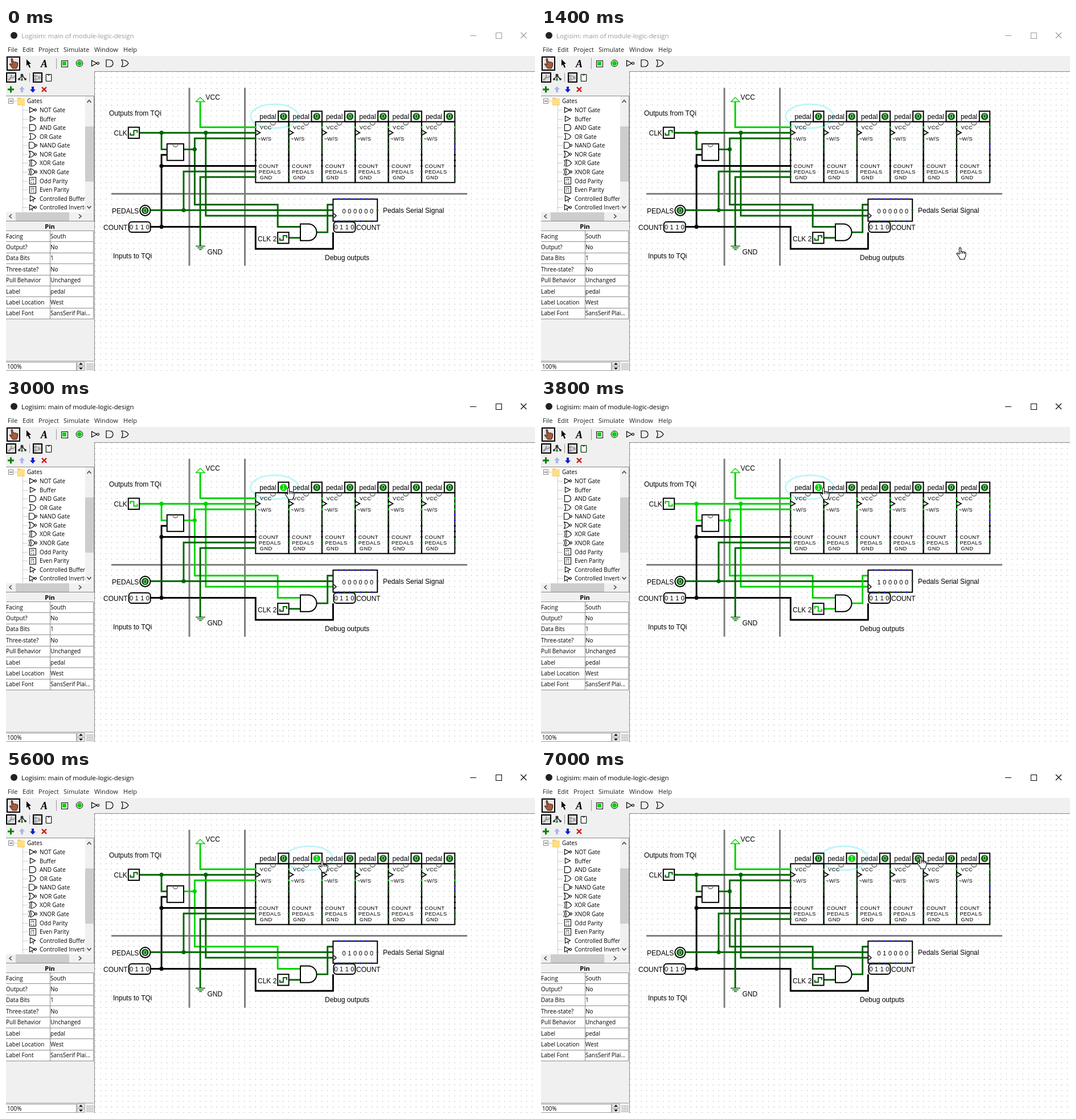
An HTML page that plays this animation: 929x603 px, repeating every 7.1 s.

```html
<!DOCTYPE html>
<html lang="en">
<head>
<meta charset="utf-8">
<title>Logic design</title>
<style>
html, body { margin: 0; width: 100%; height: 100%; overflow: hidden; background: #fff; }
svg { display: block; width: 929px; height: 603px; }
text { white-space: pre; }
.ui { font-family: "Open Sans", "Noto Sans", sans-serif; font-size: 10px; }
.menu { font-family: "Open Sans", "Noto Sans", sans-serif; font-size: 11.1px; fill: #222; }
.lab { font-family: "Liberation Sans", Arial, sans-serif; font-size: 12px; }
.port { font-family: "Liberation Sans", Arial, sans-serif; font-size: 9.3px; letter-spacing: .4px; }
.num { font-family: "Liberation Sans", Arial, sans-serif; font-size: 11px; text-anchor: middle; }
.wire { fill: none; stroke-width: .3; }
.wave { fill: none; stroke-width: 2; }
.box { fill: none; stroke: #000; stroke-width: 2; }
.thin { fill: none; stroke: #000; stroke-width: 1.2; }
</style>
</head>
<body>
<svg id="stage" viewBox="0 0 929 603" xmlns="http://www.w3.org/2000/svg"></svg>
<script>
const stage = document.getElementById('stage');
// The circuit lies on a grid: X0, Y0 is the clock input of the first chip
const X0 = 438.3, Y0 = 184.2, GRID = 9.72;
const LOOP = 7100, ON = '#00d200', OFF = '#006400';
const range = n => [...Array(n).keys()];

const rect = (x, y, w, h, fill, extra = '') =>
  `<rect x="${x}" y="${y}" width="${w}" height="${h}" fill="${fill}" ${extra}/>`;
const box = (x, y, w, h, rx = 0) =>
  `<rect class="box" x="${x}" y="${y}" width="${w}" height="${h}" rx="${rx}"/>`;
const text = (cls, x, y, s, extra = '') => `<text class="${cls}" x="${x}" y="${y}" ${extra}>${s}</text>`;
const line = (d, color, width = 1, extra = '') =>
  `<path d="${d}" fill="none" stroke="${color}" stroke-width="${width}" ${extra}/>`;
const shape = (d, fill, extra = '') => `<path d="${d}" fill="${fill}" ${extra}/>`;
const dot = (x, y, r, fill, extra = '') => `<circle cx="${x}" cy="${y}" r="${r}" fill="${fill}" ${extra}/>`;
const wire = (d, color) => `<path class="wire" d="${d}" stroke="${color}"/>`;
const onGrid = s => `<g transform="translate(${X0} ${Y0}) scale(${GRID})">${s}</g>`;
const crisp = 'shape-rendering="crispEdges"';

// Small gate symbols centred on (x, y)
const gates = {
  buffer: 'M-5 -5L5 0L-5 5Z',
  not: 'M-6 -5L3 0L-6 5ZM3 0a2 2 0 1 0 4 0a2 2 0 1 0-4 0',
  and: 'M-6 -6H0A6 6 0 0 1 0 6H-6Z',
  nand: 'M-7 -6H-2A6 6 0 0 1-2 6H-7ZM4 0a2 2 0 1 0 4 0a2 2 0 1 0-4 0',
  or: 'M-6 -6Q3 -6 6 0Q3 6-6 6Q-2 0-6 -6Z',
  nor: 'M-7 -6Q0 -6 3 0Q0 6-7 6Q-3 0-7 -6ZM3 0a2 2 0 1 0 4 0a2 2 0 1 0-4 0',
  xor: 'M-4 -6Q4 -6 7 0Q4 6-4 6Q0 0-4 -6ZM-7 -6Q-3 0-7 6',
  xnor: 'M-5 -6Q1 -6 4 0Q1 6-5 6Q-1 0-5 -6ZM-8 -6Q-4 0-8 6M4 0a2 2 0 1 0 4 0a2 2 0 1 0-4 0',
  ctrl: 'M-5 -5L5 0L-5 5ZM1 3V7',
  ctrlNot: 'M-6 -5L3 0L-6 5ZM3 0a2 2 0 1 0 4 0a2 2 0 1 0-4 0M-1 3V7'
};
const gate = (kind, x, y, s = 1) => `<path class="thin" transform="translate(${x} ${y}) scale(${s})" d="${gates[kind]}"/>`;
const parity = (x, y) => rect(x - 5, y - 6, 11, 12, '#fff', `stroke="#000" ${crisp}`) +
  text('ui', x + .5, y - .5, '2k', 'style="font-size:6px" text-anchor="middle"') +
  text('ui', x + .5, y + 5, '+1', 'style="font-size:6px" text-anchor="middle"');
const chevron = (x, y, turn) =>
  `<path d="M-3.5 2L0 -2L3.5 2" transform="translate(${x} ${y}) rotate(${turn})" fill="none" stroke="#444" stroke-width="1.5"/>`;

function header() {
  const menus = [['File', 3], ['Edit', 29], ['Project', 57], ['Simulate', 101], ['Window', 155], ['Help', 206]];
  return rect(0, 0, 929, 49, '#fff') + rect(0, 49, 929, 28, '#f0f0f0') +
    dot(14, 13, 6, '#222') +
    text('menu', 27, 17.5, 'Logisim: main of module-logic-design', 'style="font-size:11.4px;fill:var(--title)"') +
    line('M815 13.5H826', 'var(--title)', 1.1, crisp) +
    `<rect x="860" y="8" width="10" height="10" fill="none" stroke="var(--title)" ${crisp}/>` +
    line('M904 8L914 18M914 8L904 18', 'var(--title)', 1.2) +
    menus.map(([s, x]) => text('menu', x, 42, s)).join('');
}

function toolbar() {
  const hand = 'M9 54q1.5-1 2.5 0l1 6l1.5-1l1.5 1l1.5-.5l1.5 1l2 .5v5l-2 5h-7l-5-7q0-2 2-1l2 2z';
  const hub = line('M28 83L23 90M28 83L28 90M28 83L34 90', '#000', 1.2);
  return rect(2, 51, 22, 23, '#e6e6e6', `stroke="#000" stroke-width="2" ${crisp}`) +
    shape(hand, '#a85a3c', 'stroke="#40190c" stroke-width="1"') +
    shape('M36 55L44 63H40.5L43 69L41 70L38.5 64L36 66.5Z', '#000') +
    text('lab', 61, 69, 'A', 'style="font:italic bold 18px \'Liberation Serif\',serif"') +
    rect(88, 53, 1, 19, '#999') +
    rect(97, 57, 11, 11, '#fff', `stroke="#000" stroke-width="1" ${crisp}`) + rect(99, 59, 7, 7, ON) +
    dot(129, 62, 5.8, '#fff', 'stroke="#000"') + dot(129, 62, 4.3, ON) +
    gate('not', 156.5, 62) + gate('and', 182, 62) + gate('or', 209, 62) +
    rect(1, 79, 16, 16, '#ddd', `stroke="#000" stroke-width="2" ${crisp}`) +
    line('M4 92L10 86', '#999', 3) + line('M10 82q-2 4 1 5q3 1 4-3', '#999', 2) +
    hub + dot(28, 83, 2.5, '#333') + dot(23, 90, 2, '#333') + dot(28, 91, 2, '#2a8a2a') + dot(34, 90, 2, '#333') +
    rect(41, 79, 1, 16, '#999') +
    rect(48, 79, 15, 16, '#ddd', `stroke="#000" stroke-width="2" ${crisp}`) +
    [[50, 83], [50, 89], [57, 86]].map(([x, y]) => rect(x, y, 3, 3, 'none', 'stroke="#777"')).join('') +
    line('M54 84.5H57V88M54 90.5H57', '#999') +
    rect(70.5, 81.5, 9, 12, '#fff', `stroke="#000" ${crisp}`) +
    line('M73 82q2 3 4 0', '#000') +
    [84, 87.5, 91].map(y => dot(70, y, 1, '#2a8a2a') + dot(80, y, 1, '#2a8a2a')).join('') +
    line('M3 108H14M8.5 102.5V113.5', '#008000', 3) +
    shape('M28 102.5L33 108H30V113H26V108H23Z', '#aab4ec') +
    shape('M47 113.5L52 108H49V103H45V108H42Z', '#0a20d0') +
    line('M63 104L71 112M71 104L63 112', '#d01010', 2.4);
}

function tree() {
  const items = [['NOT Gate', 'not'], ['Buffer', 'buffer'], ['AND Gate', 'and'], ['OR Gate', 'or'],
    ['NAND Gate', 'nand'], ['NOR Gate', 'nor'], ['XOR Gate', 'xor'], ['XNOR Gate', 'xnor'],
    ['Odd Parity', 0], ['Even Parity', 0], ['Controlled Buffer', 'ctrl'], ['Controlled Inverter', 'ctrlNot']];
  const rows = items.map(([name, kind], i) => {
    const y = 144 + i * 15.57;
    return line(`M29.5 ${Math.round(y) + .5}H38`, '#999', 1, 'stroke-dasharray="1 1"') +
      (kind ? gate(kind, 47, y, .92) : parity(46, y)) + text('ui', 59, y + 4, name);
  }).join('');
  return rect(0, 120, 154, 219, '#fff') + line('M0 119.5H154.5V339.5H0', '#888', 1, crisp) +
    '<clipPath id="clip"><rect x="0" y="120" width="138.5" height="203"/></clipPath><g clip-path="url(#clip)">' +
    line('M29.5 136V323', '#999', 1, 'stroke-dasharray="1 1"') +
    rect(4.5, 124.5, 8, 8, '#fff', `stroke="#888" ${crisp}`) + line('M6 128.5H11', '#223', 1, crisp) +
    line('M14 128.5H20', '#999', 1, 'stroke-dasharray="1 1"') +
    shape('M20 122h5l2 2h6v12h-13z', '#f6d06b') + rect(21, 125, 12, 10, '#ffdf86') +
    text('ui', 37, 132, 'Gates') + rows + '</g>' +
    rect(139, 120, 15, 203, '#f0f0f0') + rect(139, 173, 15, 97, '#cdcdcd') +
    chevron(146, 129, 0) + chevron(146, 315, 180) +
    rect(0, 324, 154, 15, '#f0f0f0') + rect(17, 324, 94, 15, '#cdcdcd') +
    chevron(8, 331, -90) + chevron(130, 331, 90);
}

function properties() {
  const rows = [['Facing', 'South'], ['Output?', 'No'], ['Data Bits', '1'], ['Three-state?', 'No'],
    ['Pull Behavior', 'Unchanged'], ['Label', 'pedal'], ['Label Location', 'West'], ['Label Font', 'SansSerif Plai...']];
  const edge = i => Math.round(356 + i * 19.4) + .5;
  return rect(0, 340, 154, 16, '#f0f0f0') +
    text('ui', 77, 353, 'Pin', 'text-anchor="middle" font-weight="700" style="font-size:11px"') +
    rect(0, 356, 154, 156, '#fff') +
    rows.map(([a, b], i) => text('ui', 0, 369.5 + i * 19.4, a) + text('ui', 78, 369.5 + i * 19.4, b)).join('') +
    line(range(9).map(i => `M0 ${edge(i)}H154`).join('') + 'M77.5 356V511M153.5 356V511', '#8c8c8c', 1, crisp) +
    line('M0 585.5H154', '#a0a0a0', 1, crisp) +
    rect(0, 587, 124, 16, '#fff') + line('M0 587.5H123.5V602.5H0', '#999', 1, crisp) +
    text('ui', 2, 599, '100%') +
    rect(125, 587, 13, 7, '#e8e8e8', 'stroke="#aaa"') + rect(125, 595, 13, 7, '#e8e8e8', 'stroke="#aaa"') +
    shape('M128 592L131.5 588.5L135 592ZM128 597L131.5 600.5L135 597Z', '#000') +
    range(25).map(i => rect(142 + i % 5 * 2.5, 590 + (i / 5 | 0) * 2.5, 1, 1, '#555')).join('');
}

function gridDots() {
  let d = '';
  for (let row = -11; row < 44; row++)
    for (let col = -29; col < 51; col++) d += `M${col - .05} ${row - .05}h.1v.1h-.1z`;
  return onGrid(shape(d, '#808080'));
}

const clock = (x, y, id) => box(x, y, 19.4, 19.4) + `<path id="${id}" class="wave" stroke="var(--${id})"/>`;
const clockWave = (x, y, high) => {
  const s = high ? -1 : 1;
  return `M${x - 6} ${y}v${4 * s}h6v${-8 * s}h6v${4 * s}`;
};
const bits = (x, y, s, step) => [...s].map((c, i) => text('num', x + i * step, y, c)).join('');

function pedalChip(i) {
  const x = X0 + i * 6 * GRID;
  const label = (dx, y, s) => text('port', x + dx, y, s);
  return box(x, Y0 - 2 * GRID, 6 * GRID, 11 * GRID) + box(x + 39.9, 146.3, 18.4, 18.4) +
    dot(x + 49.1, 155.5, 6.3, `var(--p${i})`) +
    text('num', x + 49.1, 159.4, '0', `id="pin${i}" fill="#fff"`) +
    text('lab', x + 7, 160, 'pedal') +
    line(`M${x + 26} 165.5c0 7 9 7 9 0`, '#808080', 1.8) +
    line(`M${x + 1} 180l7 4l-7 4`, '#000', 1.6) +
    label(7.5, 178, 'VCC') + label(3.5, 197.5, '~W/S') +
    label(5.5, 245.5, 'COUNT') + label(5.5, 256, 'PEDALS') + label(7.5, 265.5, 'GND');
}

function chipPorts() {
  const colors = [ON, 'var(--clk)', 'var(--ws)', '#22f', '#22f', '#000', '#000', '#000', OFF, OFF];
  return onGrid(range(7).map(i => colors.map((c, k) =>
    dot(i * 6, k - 1, .18, i < 6 && c === '#22f' ? OFF : c)).join('')).join(''));
}

function wires() {
  const clk = 'var(--clk)', ws = 'var(--ws)';
  const joints = [[-17, 0, clk], [-9, 0, clk], [-11, 3, ws], [-17, 6, '#000'], [-17, 17, '#000'], [-13, 14, OFF]];
  return onGrid(
    wire('M-10 -5.6V-1H0', ON) +
    wire('M-21 0H0M-17 0V3H-16M-9 0V15H14', clk) +
    wire('M-13 3H-11M0 1H-11V13H4V17H8', ws) +
    wire('M-19 17H0V21H14V18M-17 17V4H-16M-17 6H0', '#000') +
    wire('M-19 14H14M-13 14V7H0M0 8H-10V20.5', OFF) +
    wire('M6 19H8', 'var(--clk2)') +
    wire('M11 18H13V13H14', 'var(--and)') +
    joints.map(([x, y, c]) => dot(x, y, .37, c)).join(''));
}

function circuit() {
  const halo = '<ellipse id="halo" cy="155" rx="42" ry="21" fill="none" stroke="#c0f6fa" stroke-width="3"/>';
  const notes = [['Outputs from TQi', 181, 153.5], ['VCC', 350.5, 125.5], ['CLK', 189.5, 189], ['PEDALS', 186, 325.5],
    ['COUNT', 171, 355], ['Inputs to TQi', 188, 404.5], ['GND', 353.5, 398], ['CLK 2', 442, 374.5],
    ['Debug outputs', 560, 407.5], ['Pedals Serial Signal', 662, 325], ['COUNT', 615, 355]];
  return gridDots() + halo +
    line('M322 105V418M419.5 105V418M185 291.5H810', '#808080', 3) +
    notes.map(([s, x, y]) => text('lab', x, y, s)).join('') +
    wires() + range(6).map(pedalChip).join('') +
    line('M341.1 122L349 129.5H333.5Z', ON, 1.3) +
    line('M333 383.5H350M336 386.5H347M339 389.5H344', OFF, 1.5) +
    box(282.8, 203.6, 29.2, 29.2) + line('M293 204c0 6.500 9 6.500 9 0', '#808080', 1.8) +
    clock(214.8, 174.5, 'clk') + clock(477.2, 359.2, 'clk2') +
    line('M517 344.6H531A14.6 14.6 0 0 1 531 373.8H517Z', '#000', 2) +
    dot(244.4, 320.8, 9.1, 'none', 'stroke="#000" stroke-width="2"') + dot(244.4, 320.8, 6.3, OFF) +
    text('num', 244.4, 324.7, '0', 'fill="#fff"') +
    box(215.7, 340.7, 38, 18.4, 5) + bits(220, 353.5, '0110', 9.6) +
    box(575.4, 340.7, 38, 18.4, 5) + bits(579.5, 353.5, '0110', 9.6) +
    box(574.4, 300.8, 77.8, 38.9) +
    range(7).map(i => dot(584 + i * GRID, 300.8, 1.7, '#22f') + dot(584 + i * GRID, 339.7, 1.7, i % 2 ? OFF : '#22f')).join('') +
    dot(652.2, 320.3, 1.7, OFF) + line('M575.5 326l4.5 4l-4.5 4', '#000', 1.4) +
    range(6).map(i => text('num', 593.5 + i * GRID, 325.5, '0', `id="bit${i}"`)).join('') +
    chipPorts();
}

const pointer = '<path id="pointer" fill="#fff" stroke="#000" stroke-width="1.1" stroke-linejoin="round" d="M-1.5 1q1.5-2 3 0v6q1.5-1 3 .5q2-1 3 .7q2-.5 2.5 1v4q0 3-2 5v2.5h-8.5v-2l-5-7q-1-2.5 1-2.5l3 2.5zM1.5 7v4M4.5 7.5v3.5M7.5 8.2v3"/>';

stage.innerHTML = rect(0, 0, 929, 603, '#fff') + circuit() + rect(0, 76, 156, 527, '#f0f0f0') +
  header() + toolbar() + tree() + properties() +
  line('M155.5 603V76.5H929', '#8c8c8c', 1, crisp) + pointer;

const el = Object.fromEntries([...stage.querySelectorAll('[id]')].map(e => [e.id, e]));

// A signal is high inside any of its [start, end) spans
const signals = {
  active: [[2500, LOOP]],
  clk: [[2800, 5200]],
  clk2: [[3700, 5400]],
  ws: [[2800, 3900], [5000, 6300]],
  p0: [[2600, 3900]],
  p1: [[4900, LOOP]]
};
const high = (name, t) => (signals[name] || []).some(([a, b]) => t >= a && t < b);

const path = [[300, 790, 606], [900, 755, 404], [1300, 755, 404], [1900, 498, 163], [2000, 497, 161],
  [2400, 496, 156], [4000, 496, 156], [4400, 555, 159], [6200, 555, 159], [6800, 667, 153], [LOOP, 667, 153]];
function pointerAt(t) {
  const i = path.findIndex(k => k[0] > t);
  if (i < 1) return null;
  const [a, b] = [path[i - 1], path[i]];
  const u = (t - a[0]) / (b[0] - a[0]), e = u * u * (3 - 2 * u);
  return [a[1] + (b[1] - a[1]) * e, a[2] + (b[2] - a[2]) * e];
}

function draw(t) {
  const set = (name, value) => stage.style.setProperty('--' + name, value);
  const level = (name, on) => set(name, on ? ON : OFF);
  set('title', high('active', t) ? '#000' : '#999');
  for (const name of ['clk', 'clk2', 'ws']) level(name, high(name, t));
  level('and', high('clk2', t) && high('ws', t));
  for (let i = 0; i < 6; i++) {
    const on = high('p' + i, t);
    level('p' + i, on);
    el['pin' + i].textContent = on ? '1' : '0';
  }
  el.clk.setAttribute('d', clockWave(224.5, 184.2, high('clk', t)));
  el.clk2.setAttribute('d', clockWave(486.9, 368.9, high('clk2', t)));
  const lit = t < 3700 ? -1 : t < 5100 ? 0 : 1;
  for (let i = 0; i < 6; i++) el['bit' + i].textContent = i === lit ? '1' : '0';
  el.halo.setAttribute('cx', t < 4900 ? 471.5 : 532);
  const p = pointerAt(t);
  el.pointer.style.display = p ? '' : 'none';
  if (p) el.pointer.setAttribute('transform', `translate(${p[0].toFixed(1)} ${p[1].toFixed(1)})`);
}

const start = performance.now();
function tick() {
  const t = (performance.now() - start) % LOOP;
  draw(Math.floor(t / 100) * 100);
  requestAnimationFrame(tick);
}
draw(0);
requestAnimationFrame(tick);
</script>
</body>
</html>
```
